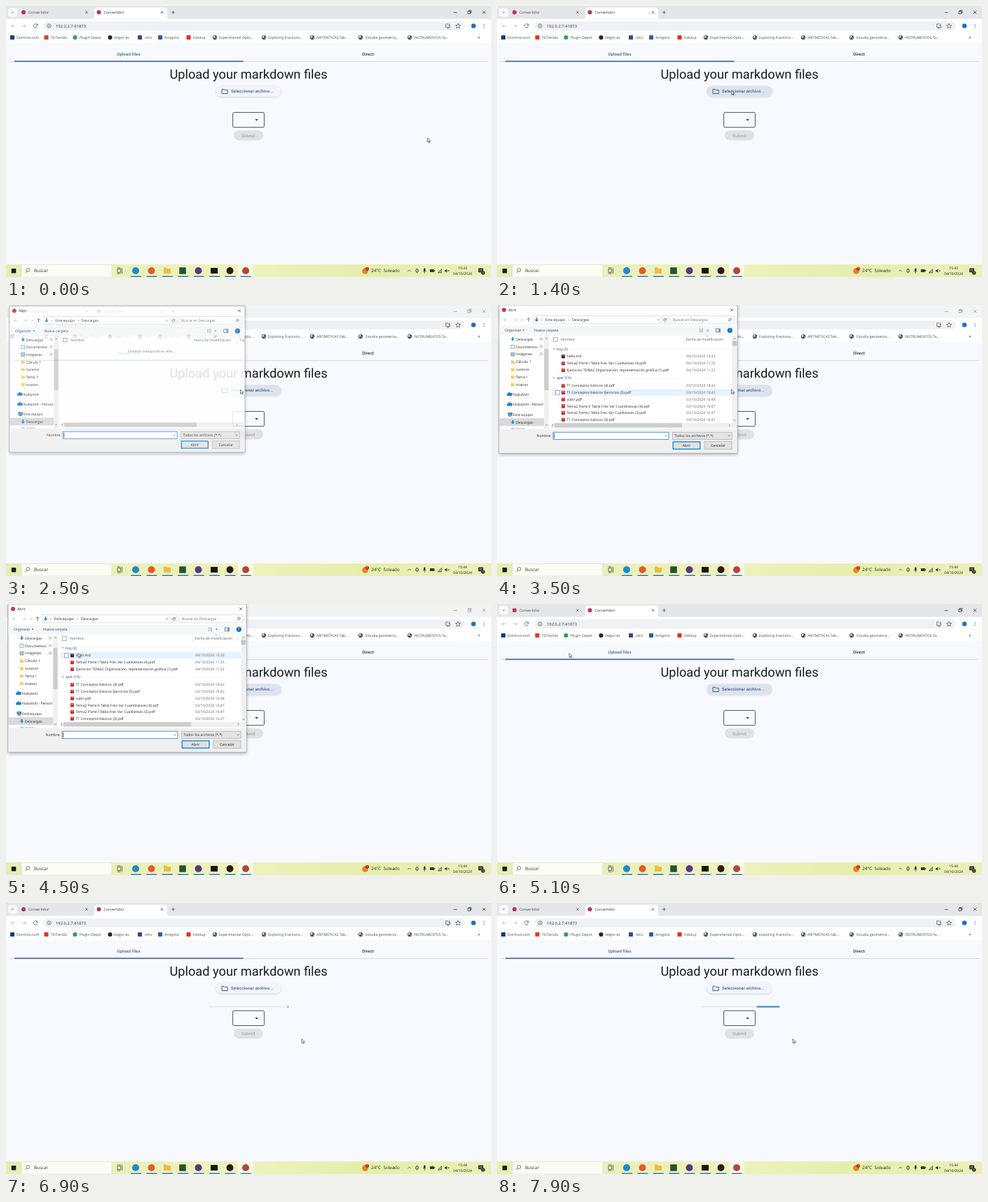
An HTML page for the animation above (8 s loop, 692 by 388 pixels).

```html
<!DOCTYPE html>
<html lang="es">
<head>
<meta charset="utf-8">
<title>Convertidor</title>
<style>
html, body { margin: 0; width: 100%; height: 100%; overflow: hidden; background: #f8f9ff; }
svg { display: block; width: 100vw; height: 100vh; text-rendering: geometricPrecision; }
text { font-family: "Open Sans", "Noto Sans", sans-serif; white-space: pre; }
.app { font-family: Roboto, sans-serif; }
</style>
</head>
<body>
<svg id="stage" viewBox="0 0 692 388"></svg>
<script>
const $ = id => document.getElementById(id);

// Drawing helpers; text is placed by its vertical centre.
const text = (x, y, s, size = 5.15, fill = '#2b2b2b', more = '') =>
  `<text x="${x}" y="${y + size * 0.36}" font-size="${size}" fill="${fill}" ${more}>${s}</text>`;
const rect = (x, y, w, h, fill, more = '') =>
  `<rect x="${x}" y="${y}" width="${w}" height="${h}" fill="${fill}" ${more}/>`;
const dot = (x, y, r, fill, more = '') => `<circle cx="${x}" cy="${y}" r="${r}" fill="${fill}" ${more}/>`;
const line = (d, stroke = '#444', w = 0.7, more = '') =>
  `<path d="${d}" fill="none" stroke="${stroke}" stroke-width="${w}" ${more}/>`;
const fill = (d, color) => `<path d="${d}" fill="${color}"/>`;
const group = (id, body, more = '') => `<g id="${id}" ${more}>${body}</g>`;
const square = (x, y, s, color) => rect(x - s / 2, y - s / 2, s, s, color, 'rx=".6"');
const cross = (x, y, r, color) => line(`M${x - r} ${y - r}l${2 * r} ${2 * r}m0 ${-2 * r}l${-2 * r} ${2 * r}`, color);
const chevron = (x, y, r = 1.5, color = '#555', dir = 1) =>
  line(`M${x - r} ${y - dir * r / 2}l${r} ${dir * r}l${r} ${-dir * r}`, color, 0.7);
const arrow = (x, y, dir, color) =>
  line(`M${x - 2.5} ${y}h5M${x + dir * 0.3} ${y - 2.3}l${dir * 2.2} 2.3l${-dir * 2.2} 2.3`, color, 0.75);
const reload = (x, y, r) =>
  line(`M${x + r} ${y - r * 0.5}A${r} ${r} 0 1 0 ${x + r} ${y + r * 0.4}M${x + r} ${y - r}v${r * 0.8}h${-r * 0.8}`, '#444', 0.75);
const lens = (x, y, r) => dot(x, y, r, 'none', 'stroke="#444" stroke-width=".7"') +
  line(`M${x - r * 0.7} ${y + r * 0.7}l${-r} ${r}`);
const folder = (x, y, w, h, color) => fill(`M${x} ${y}h${w * 0.4}l${w * 0.12} ${h * 0.18}h${w * 0.48}v${h * 0.82}h${-w}z`, color);
const download = (x, y) => fill(`M${x - 1} ${y - 3}h2v2.6h1.8l-2.8 3l-2.8-3h1.8z`, '#1e88d2');
const globe = (x, y) => dot(x, y, 3.1, '#3c4043') +
  fill(`M${x - 2.3} ${y - 1}l2-1.4l1 1.2l-1.2 1.3l-.6 1.6z`, '#fff') + fill(`M${x + 0.6} ${y + 0.4}l1.7-.5l-.8 2.1z`, '#fff');

function browser() {
  const labels = [
    [9, 15, 'Dormivo.com', '#123a86'], [57.5, 64, 'TiliTienda', '#df3a25'],
    [98.5, 105, 'Plugin Depot', '#2f9d5c', 1], [148.5, 154, 'Velgor.es', '#2b2723', 1],
    [191, 198, 'oVix', '#3a4a86'], [220, 226, 'Amigolio', '#2c5fa8'], [260.5, 266.5, 'Vidolup', '#e0302a'],
    [298, 304, 'Experimental Optic...'], [368, 374, 'Exploring Fractions...'], [437, 443, 'ARITMÉTICAS Tab...'],
    [506, 513, 'Estudia geometría...'], [576, 582, 'INSTRUMENTOS Ta...']
  ];
  const marks = labels.map(([ix, x, s, c, round]) =>
    (c ? (round ? dot(ix, 45, 3.1, c) : square(ix, 45, 6, c)) : globe(ix, 45)) + text(x, 45, s, 5.1, '#45484c')).join('');
  return rect(0, 0, 692, 19, '#e4e6e9', 'id="strip"') +
    rect(3, 3, 13, 12.5, '#f8f9fa', 'rx="3.5"') + chevron(9.3, 9, 1.5, '#333') +
    fill('M123 18.5q3 0 3-3v-9q0-4 4-4h96q4 0 4 4v9q0 3 3 3z', '#fff') +
    dot(25, 9, 3, '#b8325c') + text(32, 9, 'Convertidor', 5.25, '#4a4d51') + cross(115, 9, 1.8, '#444') +
    dot(132.5, 9, 3, '#b8325c') + text(139.5, 9, 'Convertidor', 5.25, '#333') + cross(222.5, 9, 1.8, '#333') +
    line('M236 9h5M238.5 6.5v5', '#444') +
    group('controls', line('M638.5 9.3h5M659 7.5h3.6v3.6h-3.6zM660.2 7.3v-1h3.6v3.6h-1', '#222') + cross(682, 9, 2.1, '#222')) +
    rect(0, 18.5, 692, 35, '#fff') + rect(53.5, 22, 601, 13, '#eef1f6', 'rx="6.5"') +
    arrow(10, 28.5, -1, '#b4b7bb') + arrow(26, 28.5, 1, '#b4b7bb') + reload(42, 28.5, 2.8) +
    dot(61.5, 28.5, 2.7, 'none', 'stroke="#444" stroke-width=".7"') + line('M61.5 28v1.8M61.5 26.7v.6') +
    text(71, 28.5, '192.0.2.7:41873', 5.85, '#2c2f33') +
    line('M631 25.8h-3.4v4.8h6v-1.6M629 32h3.5M632.7 25.3v3.2m-1.3-1.2l1.3 1.3l1.3-1.3') +
    line('M645 25l1 2.4l2.6.2l-2 1.7l.6 2.5l-2.2-1.4l-2.2 1.4l.6-2.5l-2-1.7l2.6-.2z') +
    dot(667, 28.5, 3.2, '#1d6fc4') + [26.3, 28.5, 30.7].map(y => dot(682, y, 0.6, '#444')).join('') +
    marks + text(673, 44.5, '»', 7, '#444');
}

function page() {
  const app = (x, y, s, color) => text(x, y, s, 6.1, color, 'class="app" font-weight="500" letter-spacing=".07" text-anchor="middle"');
  return rect(0, 53.5, 692, 317, '#f8f9ff') +
    app(175, 69.3, 'Upload files', '#41648f') + app(516.5, 69.3, 'Direct', '#2c2f34') +
    rect(5, 79.4, 683, 0.7, '#c6c9d1') + rect(12, 78.4, 326.5, 1.7, '#4a6b95') +
    text(346, 97.3, 'Upload your markdown files', 18.25, '#1b1d21', 'class="app" text-anchor="middle"') +
    rect(299.4, 115.3, 93.2, 15.4, '#8d96a8', 'rx="7.7" opacity=".38" filter="url(#soft)"') +
    rect(299.2, 114.5, 93.6, 15.2, '#f2f4fb', 'rx="7.6"') +
    rect(299.2, 114.5, 93.6, 15.2, '#dde3ed', 'rx="7.6" id="hover"') +
    rect(299.2, 114.5, 93.6, 15.2, '#7892b5', 'rx="7.6" id="press"') +
    line('M308 119.2h3l1 1.1h4.2v5.2h-8.2z', '#3c608c', 1) + app(351.2, 122.3, 'Seleccionar archivo...', '#3d618e') +
    group('bar', rect(290.5, 147.6, 112.5, 1.9, '#e6e9ee') + rect(290.5, 147.4, 0, 2.2, '#2f97d9', 'id="run1"') +
      rect(290.5, 147.4, 0, 2.2, '#2f97d9', 'id="run2"')) +
    group('form', rect(323.6, 152.4, 44.8, 21.3, '#f9faff', 'rx="1.8" stroke="#3c3f44" stroke-width=".9"') +
      fill('M355.2 162.1h4.8l-2.4 2.5z', '#3a3d42') +
      rect(325, 178.2, 42, 14.2, '#dfe1e7', 'rx="7.1"') + app(346, 185.4, 'Submit', '#a5a8b0'));
}

function taskbar() {
  const icons = [
    dot(185, 379, 5, '#1f8acb'), dot(207.5, 379, 5, '#e25a2c'),
    folder(225, 374.5, 10, 8.5, '#edbb45'), square(252, 379, 9.5, '#24512f'),
    dot(274.5, 379, 5, '#5a3583'), rect(292, 375, 10, 8, '#151515'),
    dot(319.5, 379, 5, '#30181a'), dot(342, 379, 5, '#b5453c')
  ];
  return rect(0, 370, 692, 18, 'url(#grass)') + square(11, 379.2, 6.5, '#1c1c1c') +
    rect(22, 370.3, 129, 17.7, '#fbfcf3', 'stroke="#d3d8b8" stroke-width=".5"') +
    lens(31.5, 378, 2.4) + text(40, 379.2, 'Buscar', 6.3, '#333') +
    line('M159 376.5h4.5v5h-4.5zM158.7 374.8h5M158.7 383.2h5M165.5 375v8.2', '#333') +
    rect(331, 370, 21.5, 18, '#fff', 'opacity=".6"') +
    icons.map((s, i) => s + rect(178 + i * 22.4, 386.6, 15, 1.4, '#2379b5')).join('') +
    dot(512.5, 379.5, 4.4, '#e5832e') + dot(515.4, 376.3, 2.6, '#c62a24') + text(514.6, 376.2, '1', 3.6, '#fff') +
    text(521, 379.2, '24°C', 6.35, '#222') + text(538.5, 379.2, 'Soleado', 6.2, '#222') +
    chevron(575.5, 379, 2.2, '#333', -1) + dot(586.5, 379, 2.2, 'none', 'stroke="#444" stroke-width=".8"') +
    line('M586.5 375.5v7') + rect(596, 375.5, 2.4, 4.4, '#222', 'rx="1.2"') + line('M594.8 379q2.4 3.6 4.8 0M597.2 381v2') +
    rect(604.8, 377, 6, 4, '#333') + rect(611, 378, 0.8, 2, '#333') +
    line('M616 382h5.5v-5.5zM618 382v-2M620 382v-4') + fill('M626 378h1.4l1.8-1.6v5.4l-1.8-1.6h-1.4z', '#333') + cross(631.5, 379.2, 1.1, '#333') +
    text(651.5, 374.8, '15:43', 5.1, '#222', 'id="clock" text-anchor="middle"') +
    text(651.5, 383.2, '04/10/2024', 5.1, '#222', 'text-anchor="middle"') +
    rect(674, 375.5, 7, 5.8, '#222', 'rx=".6"') + line('M675.2 377.4h4.6M675.2 379.2h4.6', '#fff', 0.5) +
    dot(680.6, 382, 2.8, '#333') + text(679.6, 382, '2', 3.8, '#fff');
}

const files = [
  [73.5, 'hello.md', '04/10/2024 15:32'],
  [83.5, 'Tema2 Parte I Tabla Frec Var Cualitativas (4).pdf', '04/10/2024 11:25'],
  [93.3, 'Ejercicios TEMA2 Organización, representación gráfica (1).pdf', '04/10/2024 11:22'],
  [115.5, 'T1 Conceptos básicos (4).pdf', '03/10/2024 18:42'],
  [125.3, 'T1 Conceptos básicos Ejercicios (5).pdf', '03/10/2024 18:42'],
  [135, 'subir.pdf', '03/10/2024 16:48'],
  [144.7, 'Tema2 Parte II Tabla Frec Var Cuantitativas (4).pdf', '03/10/2024 16:47'],
  [154.4, 'Tema2 Parte I Tabla Frec Var Cualitativas (3).pdf', '03/10/2024 16:47'],
  [164, 'T1 Conceptos básicos (3).pdf', '03/10/2024 16:47']
];

function dialog() {
  const edge = c => `stroke="${c}" stroke-width=".7"`;
  const pin = y => line(`M60.5 ${y + 2}l1.6-1.6m-.8-1.8l2.8 2.8l1-1.8l-1.8-1.8z`, '#777', 0.6);
  const cloud = y => fill(`M15.5 ${y + 2}a1.6 1.6 0 0 1 0-3.2a2.2 2.2 0 0 1 4-.7a2 2 0 0 1 1.2 3.9z`, '#1b7fd0');
  const side = ['Descargas', 'Documentos', 'Imágenes', 'Cálculo 1', 'sucesos', 'Tema 1', 'triation'].map((s, i) => {
    const y = 49 + i * 10.8;
    const icon = i > 2 ? folder(20, y - 2.3, 5, 4.8, '#f3cf63') : i === 0 ? download(22.5, y)
      : rect(20, y - 2.4, 5, 4.8, i === 1 ? '#fff' : '#9ecbe8', edge('#6f8798'));
    return icon + text(27, y, s) + (i < 3 ? pin(y) : '');
  }).join('');
  const list = files.map(([y, name, date], i) =>
    rect(92, y - 2.6, 5, 5.4, i ? '#cf2a2f' : '#34252b', 'rx=".5"') + rect(93, y - 1.7, 3, 0.8, '#fff', 'opacity=".8"') +
    text(99.5, y, name) + text(270, y, date, 5.15, '#666')).join('');
  const head = (y, s) => chevron(81, y, 1.3, '#444') + text(85, y, s, 5.15, '#26398b');
  return rect(3, 1, 340, 213, '#000', 'opacity=".32" filter="url(#blur)"') +
    rect(3, 0, 340, 212, '#fff', edge('#8f959c')) +
    dot(10, 7, 3, '#c8393c') + text(16, 7, 'Abrir', 5.2) + cross(335, 7, 1.9, '#333') +
    arrow(12, 21.3, -1, '#bbb') + arrow(26, 21.3, 1, '#c8c8c8') + chevron(36, 21.3, 1.2, '#888') +
    line('M45 24v-5.4m-2.2 2.2l2.2-2.3l2.2 2.3', '#444') +
    rect(52.5, 15.6, 191.5, 11.3, '#fff', edge('#d6d6d6')) + rect(247, 15.6, 91.3, 11.3, '#fff', edge('#d6d6d6')) +
    download(56.5, 21.3) + text(63, 21, '›', 5.5) + text(69, 21.3, 'Este equipo') + text(101.5, 21, '›', 5.5) + text(107, 21.3, 'Descargas') +
    chevron(230, 21.3) + line('M234.7 16v10.6', '#d6d6d6', 0.6) + reload(239.5, 21.5, 1.9) +
    text(251, 21.3, 'Buscar en Descargas', 5.1, '#6b6b6b') + lens(332.6, 20.6, 1.6) +
    rect(3.4, 29.5, 339.2, 14, '#f5f6f7') + text(11, 36.3, 'Organizar', 5.15, '#23406c') + fill('M36.5 35.6h3l-1.5 1.6z', '#444') +
    text(53, 36.3, 'Nueva carpeta', 5.15, '#23406c') +
    line('M288.5 34.4h2M288.5 36.4h2M288.5 38.4h2M291.5 34.4h2.5M291.5 36.4h2.5M291.5 38.4h2.5', '#6d8294') +
    fill('M299 35.7h3l-1.5 1.6z', '#444') + rect(312.5, 34, 6, 4.8, '#fff', edge('#456')) + rect(316, 34, 2.5, 4.8, '#5a9bd0') +
    dot(332.3, 36.3, 3.6, '#1272b8') + text(331, 36.3, '?', 5, '#fff') +
    side + cloud(128) + text(23, 128, 'NubaVolt') + cloud(142.5) + text(23, 142.5, 'NubaVolt - Person') +
    rect(16, 154.3, 5.6, 3.8, '#4ba3d8', edge('#4a5a66')) + line('M17 159.3h3.6') + text(23, 156.7, 'Este equipo') +
    rect(4, 162.2, 63, 11, '#d9d9d9') + download(22.5, 167.8) + text(27, 167.8, 'Descargas') +
    rect(67, 44, 7, 133, '#f0f0f0') + rect(67.4, 63, 6.2, 59, '#cdcdcd') + chevron(70.5, 48, 1.4, '#555', -1) + chevron(70.5, 172, 1.4) +
    rect(20, 176.3, 5, 1.3, '#9aa5ad') + rect(27, 176.6, 13, 0.7, '#888') +
    rect(80.6, 46.7, 5.6, 5.6, '#fff', edge('#888')) + text(91, 49.5, 'Nombre', 5.15, '#4f6377') +
    line('M267 44v11M331.6 44v11', '#e2e2e2', 0.6) + text(269.5, 49.5, 'Fecha de modificación', 5.15, '#4f6377') +
    rect(77, 168.7, 265.5, 7.2, '#f0f0f0') + chevron(300, 44.6, 1.2, '#888') +
    line('M80 171l-1.3 1.3l1.3 1.3M331 171l1.3 1.3l-1.3 1.3', '#555') + rect(82, 169.2, 191, 6.2, '#cdcdcd', 'id="thumb"') +
    group('busy', text(174, 66, 'Estamos trabajando en ello...', 5, '#777') + text(335, 49.5, 'Tip', 5.15, '#4f6377')) +
    group('list', rect(78, 0, 257, 9.7, '#e5f3ff', 'id="row"') + rect(83.6, 0, 5.6, 5.6, '#fff', `id="check" ${edge('#888')}`) +
      head(62.7, 'hoy (3)') + line('M104 62.7h230', '#eceef3', 0.5) + head(104.3, 'ayer (19)') + line('M110 104.3h224', '#eceef3', 0.5) + list +
      rect(335.4, 44, 7, 124.7, '#f0f0f0') + rect(335.8, 51.5, 6.2, 7, '#c5c5c5') +
      chevron(338.9, 48, 1.4, '#555', -1) + chevron(338.9, 165, 1.4)) +
    rect(3.4, 177.6, 339.2, 34, '#f0f0f0') + text(56.5, 187.3, 'Nombre:') +
    rect(80, 182.2, 165, 10.3, '#fff', edge('#0078d7')) + chevron(241, 187.3) +
    rect(81.4, 183.6, 0.7, 7.6, '#111', 'id="caret"') + text(82.5, 187.3, 'hello.md', 5.15, '#222', 'id="name"') +
    rect(250.4, 182.2, 84.8, 10.3, '#e4e4e4', edge('#adadad')) + text(253.5, 187.3, 'Todos los archivos (*.*)') + chevron(331, 187.3) +
    rect(251.2, 195.9, 38.6, 10.4, '#e1e1e1', 'stroke="#0078d7" stroke-width="1.2"') + rect(296, 195.7, 39, 10.8, '#e1e1e1', edge('#adadad')) +
    text(270.5, 201, 'Abrir', 5.15, '#222', 'text-anchor="middle"') + text(315.5, 201, 'Cancelar', 5.15, '#222', 'text-anchor="middle"');
}

$('stage').innerHTML = `<defs>
  <filter id="soft" x="-10%" y="-40%" width="120%" height="180%"><feGaussianBlur stdDeviation=".8"/></filter>
  <filter id="blur"><feGaussianBlur stdDeviation="2.5"/></filter>
  <linearGradient id="grass"><stop stop-color="#e3edb4"/><stop offset=".25" stop-color="#eaf0ba"/>
  <stop offset=".5" stop-color="#eef1bd"/><stop offset=".75" stop-color="#e6eeab"/><stop offset="1" stop-color="#ecefb9"/></linearGradient>
  </defs>` + browser() + page() + group('dialog', dialog()) + taskbar() +
  group('cursor', '<path d="M0 0v6l1.4-1.3l1 2.2l1-.5l-1-2.1h1.9z" fill="#fff" stroke="#333" stroke-width=".65" stroke-linejoin="round"/>');

// Linear interpolation through [time, value] points.
function track(t, keys) {
  if (t <= keys[0][0]) return keys[0][1];
  for (let i = 1; i < keys.length; i++) {
    const [a, v] = keys[i - 1], [b, w] = keys[i];
    if (t <= b) return v + (w - v) * (t - a) / (b - a);
  }
  return keys[keys.length - 1][1];
}

function bezier(x1, y1, x2, y2) {
  const at = (s, a, b) => 3 * (1 - s) * (1 - s) * s * a + 3 * (1 - s) * s * s * b + s * s * s;
  return x => {
    let lo = 0, hi = 1;
    for (let i = 0; i < 24; i++) {
      const mid = (lo + hi) / 2;
      if (at(mid, x1, x2) < x) lo = mid; else hi = mid;
    }
    return at(lo, y1, y2);
  };
}

const clamp = v => Math.min(1, Math.max(0, v));
const smooth = u => u * u * (3 - 2 * u);
const moves = [
  [0, 1200, 601.5, 189, 334.5, 121, smooth],
  [3600, 4500, 334.5, 121, 103, 70.5, smooth],
  [5300, 6000, 103, 70.5, 311, 156.5, u => u ** 1.4],
  [6000, 6500, 311, 156.5, 422, 194.5, u => 1 - (1 - u) ** 1.6]
];
function pointer(t) {
  const [a, b, x, y, x2, y2, ease] = moves.filter(m => t >= m[0]).pop();
  const u = ease(clamp((t - a) / (b - a)));
  return [x + (x2 - x) * u, y + (y2 - y) * u];
}

// Two sweeping runs: head and tail each have a delay, a length and a curve.
const SWEEP = 1800, BAR_START = 5160;
const runs = [
  [[0, 750, bezier(0.2, 0, 0.8, 1)], [333, 750, bezier(0.4, 0, 1, 1)]],
  [[1000, 567, bezier(0, 0, 0.65, 1)], [1267, 533, bezier(0.1, 0, 0.45, 1)]]
];

const set = (id, attrs) => { for (const k in attrs) $(id).setAttribute(k, attrs[k]); };
const show = (id, on) => set(id, { visibility: on ? 'inherit' : 'hidden' });

function draw(t) {
  const [x, y] = pointer(t);
  set('cursor', { transform: `translate(${x} ${y})` });

  const away = t >= 1900 && t < 5000;
  set('strip', { fill: away ? '#f2f3f5' : '#e4e6e9' });
  set('controls', { opacity: away ? 0.5 : 1 });
  $('clock').textContent = t < 2200 ? '15:43' : '15:44';
  set('hover', { opacity: track(t, [[900, 0], [1300, 1], [5100, 1], [5400, 0]]) });
  set('press', { opacity: track(t, [[1500, 0], [1700, 0.2], [2200, 0]]) });

  const open = track(t, [[2300, 0], [2400, 0.45], [2500, 0.86], [2600, 1], [4900, 1], [5000, 0.4], [5100, 0]]);
  const size = track(t, [[2400, 0.97], [2500, 0.988], [2600, 1], [4900, 1], [5100, 0.96]]);
  show('dialog', open > 0);
  set('dialog', { opacity: open, transform: `translate(173 106) scale(${size}) translate(-173 -106)` });

  const loaded = t >= 2800, picked = t >= 4800;
  show('busy', !loaded);
  show('list', loaded);
  set('thumb', { width: loaded ? 182 : 191 });
  const row = picked ? files[0] : files.find(f => Math.abs(f[0] - y) < 4.9);
  show('row', row);
  show('check', row);
  if (row) {
    set('row', { y: row[0] - 4.85, fill: picked ? '#cce8ff' : '#e5f3ff' });
    set('check', { y: row[0] - 2.8 });
  }
  show('name', picked);
  show('caret', !picked && (t < 3000 || (t >= 3500 && t < 4000) || t >= 4500));

  const busy = t >= BAR_START;
  show('bar', busy);
  set('form', { transform: `translate(0 ${busy ? 1.8 : 0})` });
  const phase = (t - BAR_START + SWEEP * 3) % SWEEP;
  runs.forEach((run, i) => {
    const [head, tail] = run.map(([delay, len, ease]) => ease(clamp((phase - delay) / len)));
    set('run' + (i + 1), { x: 290.5 + tail * 112.5, width: Math.max(0, head - tail) * 112.5 });
  });
}

const LOOP = 8000, STEP = 100;
function tick() {
  draw(Math.floor(performance.now() % LOOP / STEP) * STEP);
  requestAnimationFrame(tick);
}
tick();
</script>
</body>
</html>
```
